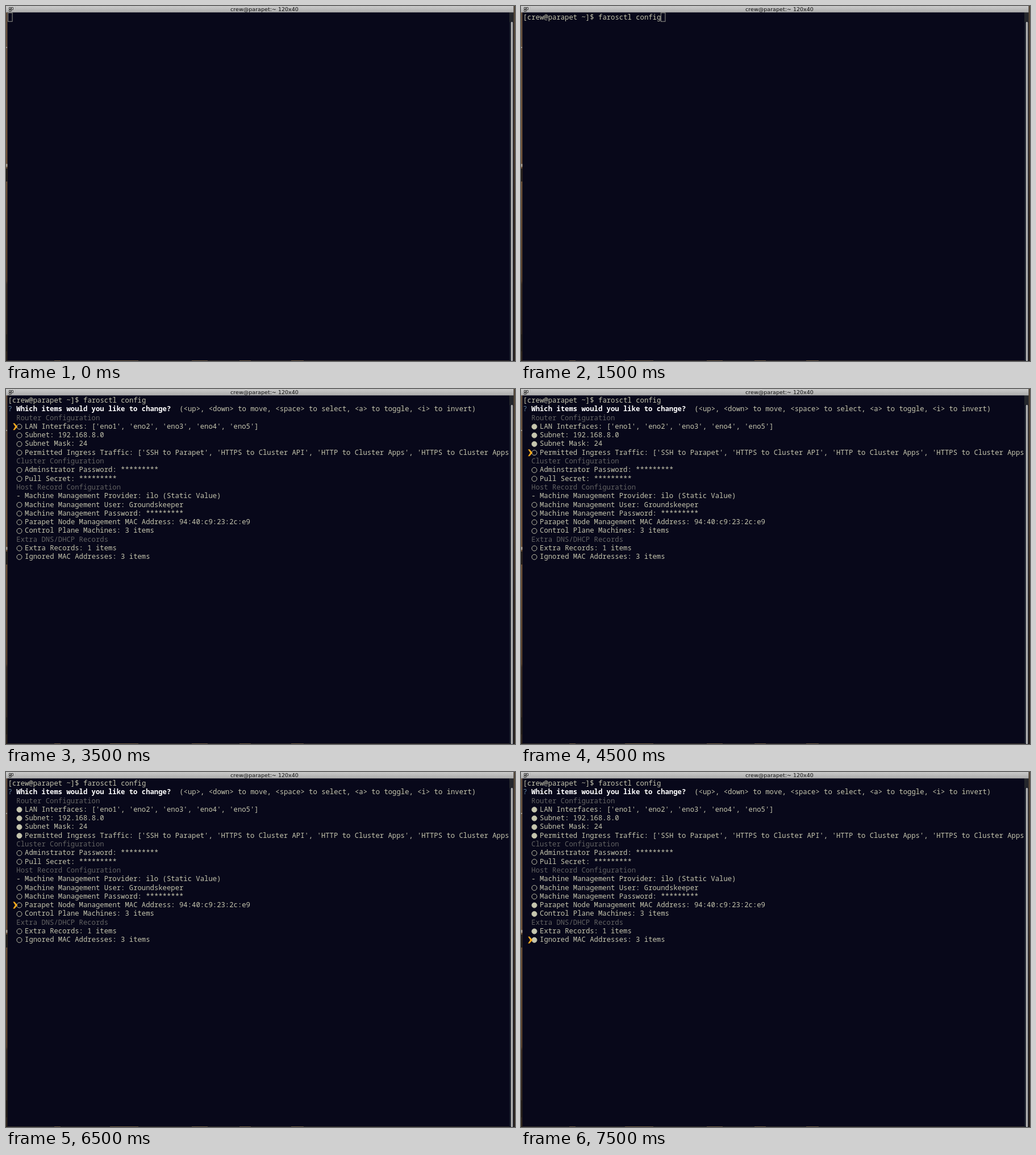
Animation, 896 px wide and 625 px high, one loop 8000 ms. Source, as an HTML page:

```html
<!DOCTYPE html>
<html lang="en">
<head>
<meta charset="utf-8">
<title>Terminal</title>
<style>
  html, body { margin: 0; width: 100%; height: 100%; overflow: hidden; background: #08081a; }
  svg { display: block; width: 896px; height: 625px; }
  .mono text { font: 12.265px "Roboto Mono", "Noto Sans Mono", monospace; fill: #c5c5ae; white-space: pre; }
  .mono .head { fill: #626262; }
  .mono .ask { fill: #5f819d; }
  .mono .bold { fill: #fff; font-weight: bold; }
  .title { font: 9.56px "DejaVu Sans", sans-serif; fill: #111; text-anchor: middle; }
</style>
</head>
<body>
<svg viewBox="0 0 896 625">
  <defs>
    <linearGradient id="bar" x2="0" y2="1">
      <stop stop-color="#cacaca"/><stop offset="1" stop-color="#acacac"/>
    </linearGradient>
    <linearGradient id="left" x2="0" y2="1">
      <stop stop-color="#66503c"/><stop offset=".4" stop-color="#72553a"/>
      <stop offset=".77" stop-color="#563f2b"/><stop offset=".78" stop-color="#3c2d22"/>
      <stop offset="1" stop-color="#2d241c"/>
    </linearGradient>
    <linearGradient id="right" x2="0" y2="1">
      <stop stop-color="#544738"/><stop offset=".4" stop-color="#4a3a2d"/>
      <stop offset=".6" stop-color="#34281f"/><stop offset="1" stop-color="#2b231d"/>
    </linearGradient>
    <linearGradient id="thumb">
      <stop stop-color="#8a8a8a"/><stop offset=".5" stop-color="#c0c0c0"/><stop offset="1" stop-color="#929292"/>
    </linearGradient>
  </defs>
  <rect width="896" height="625" fill="#08081a"/>
  <rect y="11" width="2.5" height="614" fill="url(#left)"/>
  <path d="M0 72h2v2H0zM0 278h2.5v5H0z" fill="#a49a8c"/>
  <path d="M0 286h2.5v23H0zM0 578h2.5v30H0z" fill="#211b17"/>
  <rect x="2.5" y="624" width="884" height="1" fill="#35302c"/>
  <path d="M85 624.5h11M183 624.5h50M327 624.5h28M411 624.5h20M502 624.5h22" stroke="#776449"/>
  <rect x="886" y="11" width="7.5" height="614" fill="#181c2a"/>
  <rect x="886" y="11" width="7.5" height="17" fill="#24262c"/>
  <rect x="888.7" y="28" width="3.6" height="597" rx="1.5" fill="url(#thumb)"/>
  <rect x="893.5" width="2.5" height="625" fill="url(#right)"/>
  <rect width="893.5" height="11.3" fill="url(#bar)"/>
  <path d="M16.5 1v9" stroke="#b8b8b8"/>
  <path d="M5.5 2.5h3v3h-3zM5.5 6.5h3v3h-3zM9.5 2.5h3v4h-3zM8.5 8.5h2" fill="none" stroke="#333" stroke-width=".9"/>
  <text class="title" x="455" y="9.2">crew@parapet:~ 120x40</text>
  <g class="mono" id="screen"></g>
</svg>
<script>
const NS = "http://www.w3.org/2000/svg";
const LOOP = 8000, COL = 7.358, ROW = 15.3, LEFT = 3.6, BASE = 23.9;
const screen = document.getElementById("screen");

function add(parent, tag, attrs, content = "") {
  const el = document.createElementNS(NS, tag);
  for (const key in attrs) el.setAttribute(key, attrs[key]);
  el.textContent = content;
  return parent.appendChild(el);
}

function write(parent, col, row, content, cls = "") {
  return add(parent, "text", { x: LEFT + col * COL, y: BASE + row * ROW, class: cls }, content);
}

const show = (el, on) => el.setAttribute("visibility", on ? "visible" : "hidden");

const prompt = write(screen, 0, 0, "[crew@parapet ~]$");
const command = write(screen, 18, 0, "farosctl config");
const cursor = add(screen, "rect", { width: 7.6, height: 15.2, fill: "none", stroke: "#a6a69a", "stroke-width": 0.9 });

// Prefix: "#" heading, "-" fixed value, otherwise a selectable item
const lines = [
  "#Router Configuration",
  "LAN Interfaces: ['eno1', 'eno2', 'eno3', 'eno4', 'eno5']",
  "Subnet: 192.168.8.0",
  "Subnet Mask: 24",
  "Permitted Ingress Traffic: ['SSH to Parapet', 'HTTPS to Cluster API', 'HTTP to Cluster Apps', 'HTTPS to Cluster Apps",
  "#Cluster Configuration",
  "Adminstrator Password: *********",
  "Pull Secret: *********",
  "#Host Record Configuration",
  "- Machine Management Provider: ilo (Static Value)",
  "Machine Management User: Groundskeeper",
  "Machine Management Password: *********",
  "Parapet Node Management MAC Address: 94:40:c9:23:2c:e9",
  "Control Plane Machines: 3 items",
  "#Extra DNS/DHCP Records",
  "Extra Records: 1 items",
  "Ignored MAC Addresses: 3 items"
];

const menu = add(screen, "g", {});
write(menu, 0, 1, "?", "ask");
write(menu, 2, 1, "Which items would you like to change?", "bold");
write(menu, 41, 1, "(<up>, <down> to move, <space> to select, <a> to toggle, <i> to invert)");

const dots = new Map();
lines.forEach((line, i) => {
  const row = i + 2;
  if (line[0] === "#") write(menu, 2, row, line.slice(1), "head");
  else if (line[0] === "-") write(menu, 2, row, line);
  else {
    write(menu, 4, row, line);
    dots.set(row, add(menu, "circle", { cx: 23.5, cy: 20.4 + row * ROW, r: 4.5, stroke: "#c5c5ae", "stroke-width": 1 }));
  }
});
const pointer = add(menu, "path", { d: "M12.3 14.4h2.9l5 6-5 6h-2.9l3.9-6z", fill: "#f5a81c" });

// Menu states: start time, pointer row, selected rows
const steps = [
  [3500, 3, []],
  [4500, 6, [3, 4, 5]],
  [5500, 9, [3, 4, 5, 6]],
  [6500, 14, [3, 4, 5, 6]],
  [7500, 18, [3, 4, 5, 6, 14, 15, 17, 18]]
];

function draw(t) {
  show(prompt, t >= 500);
  show(command, t >= 1500);
  show(cursor, t < 3500);
  const col = t < 500 || t >= 2500 ? 0 : t < 1500 ? 18 : 33;
  cursor.setAttribute("x", 3.5 + col * COL);
  cursor.setAttribute("y", 12 + (t >= 2500 ? ROW : 0));

  show(menu, t >= 3500);
  const [, row, picked] = steps.filter(s => t >= s[0]).pop() || steps[0];
  pointer.setAttribute("transform", `translate(0 ${row * ROW})`);
  dots.forEach((dot, r) => dot.setAttribute("fill", picked.includes(r) ? "#c5c5ae" : "none"));
}

const start = performance.now();
function tick() {
  draw((performance.now() - start) % LOOP);
  requestAnimationFrame(tick);
}
tick();
</script>
</body>
</html>
```
